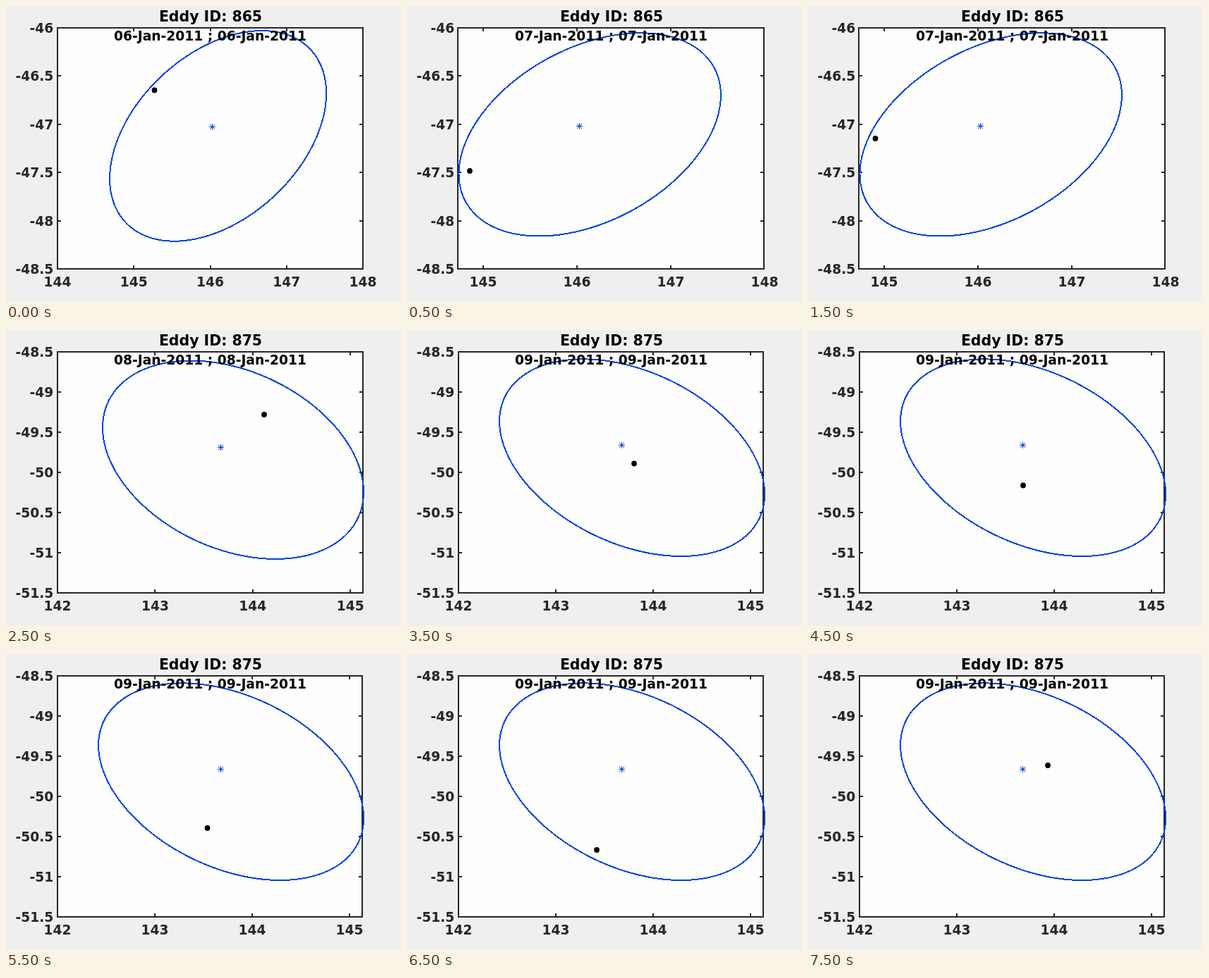
Write an HTML page that moves like this. It is 560x420 px and loops after 8000 ms.

```html
<!DOCTYPE html>
<html lang="en">
<head>
<meta charset="utf-8">
<title>Eddy track</title>
<style>
  html, body { margin: 0; width: 100%; height: 100%; overflow: hidden; background: #efefef; }
  svg { display: block; width: 560px; height: 420px; }
  text { font: bold 18.67px "DejaVu Sans", sans-serif; fill: #262626; text-anchor: middle; }
  .title { font-size: 20.45px; fill: #000; }
  .date { fill: #000; }
  .ylabel { text-anchor: end; }
  .axes { fill: none; stroke: #262626; stroke-width: 2; shape-rendering: crispEdges; }
  .eddy { fill: none; stroke: #0044dd; stroke-width: 2; shape-rendering: crispEdges; }
  .star { stroke: #0044dd; stroke-width: 1; }
</style>
</head>
<body>
<svg id="stage" viewBox="0 0 560 420"></svg>
<script>
const LOOP = 8000, TOP = 31, BOTTOM = 373;
const stage = document.getElementById('stage');

// x: first label, its position, spacing, count; y: top label and row count
// eddy: centre, half extents, correlation of the two axes
const days = [
  { id: 865, date: '06', left: 73, right: 506, x: [144, 73, 108.25, 5], y: [-46, 5],
    eddy: [300.6, 184.4, 153.5, 149.3, 0.405], star: [292, 171] },
  { id: 865, date: '07', left: 72, right: 506, x: [145, 108, 133, 4], y: [-46, 5],
    eddy: [259.2, 182.4, 185.7, 144.1, 0.388], star: [244, 170] },
  { id: 875, date: '08', left: 73, right: 506, x: [142, 73, 138.4, 4], y: [-48.5, 6],
    eddy: [322, 184.2, 185, 140.7, -0.325], star: [304, 166] },
  { id: 875, date: '09', left: 73, right: 505, x: [142, 73, 138, 4], y: [-48.5, 6],
    eddy: [319.1, 181.2, 188, 139.8, -0.37], star: [304, 163] }
];

// start time, day, drifter x, drifter y
const steps = [
  [0, 0, 210.5, 119.5], [500, 1, 89, 234], [1500, 1, 95.5, 188], [2500, 2, 366, 120],
  [3500, 3, 322, 189.5], [4500, 3, 305, 220.5], [5500, 3, 285.5, 247],
  [6500, 3, 269, 278], [7500, 3, 340, 158]
];

const label = (x, y, value, cls = '') => `<text class="${cls}" x="${x}" y="${y}">${value}</text>`;

function ellipse([cx, cy, rx, ry, corr]) {
  const shift = Math.acos(corr), points = [];
  for (let i = 0; i < 240; i++) {
    const a = i / 240 * 2 * Math.PI;
    points.push(`${(cx + rx * Math.cos(a)).toFixed(2)},${(cy - ry * Math.cos(a + shift)).toFixed(2)}`);
  }
  return `<polygon class="eddy" points="${points.join(' ')}"/>`;
}

function axes({ left, right, x: [x0, px, dx, count], y: [y0, rows] }) {
  let path = '', labels = '';
  for (let i = 0; i < count; i++) {
    const x = px + i * dx, tick = Math.min(Math.round(x), right);
    path += `M${tick} ${TOP}v5M${tick} ${BOTTOM}v-5`;
    labels += label(x, 398, x0 + i);
  }
  for (let i = 0; i <= rows; i++) {
    const y = TOP + i * (BOTTOM - TOP) / rows, tick = Math.round(y);
    path += `M${left} ${tick}h5M${right} ${tick}h-5`;
    labels += label(67.3, tick + 7, y0 - i / 2, 'ylabel');
  }
  const box = `x="${left}" y="${TOP}" width="${right - left}" height="${BOTTOM - TOP}"`;
  return `<rect ${box} fill="#fefefe"/><rect class="axes" ${box}/><path class="axes" d="${path}"/>${labels}`;
}

function draw([, day, x, y]) {
  const d = days[day], date = `${d.date}-Jan-2011`;
  const [sx, sy] = d.star.map(v => v + 0.5);
  stage.innerHTML = axes(d) + ellipse(d.eddy) +
    `<path class="star" d="M${sx - 4.5} ${sy}h9M${sx} ${sy - 4.5}v9M${sx - 3.5} ${sy - 3.5}l7 7m0 -7l-7 7"/>` +
    `<circle cx="${x}" cy="${y}" r="3.9"/>` +
    label(290, 22, `Eddy ID: ${d.id}`, 'title') +
    label(289.5, 49, `${date} ; ${date}`, 'date');
}

const start = performance.now();
let shown;
function tick() {
  const t = (performance.now() - start) % LOOP;
  const step = steps.findLast(s => s[0] <= t) || steps[0];
  if (step !== shown) draw(shown = step);
  requestAnimationFrame(tick);
}
tick();
</script>
</body>
</html>
```
